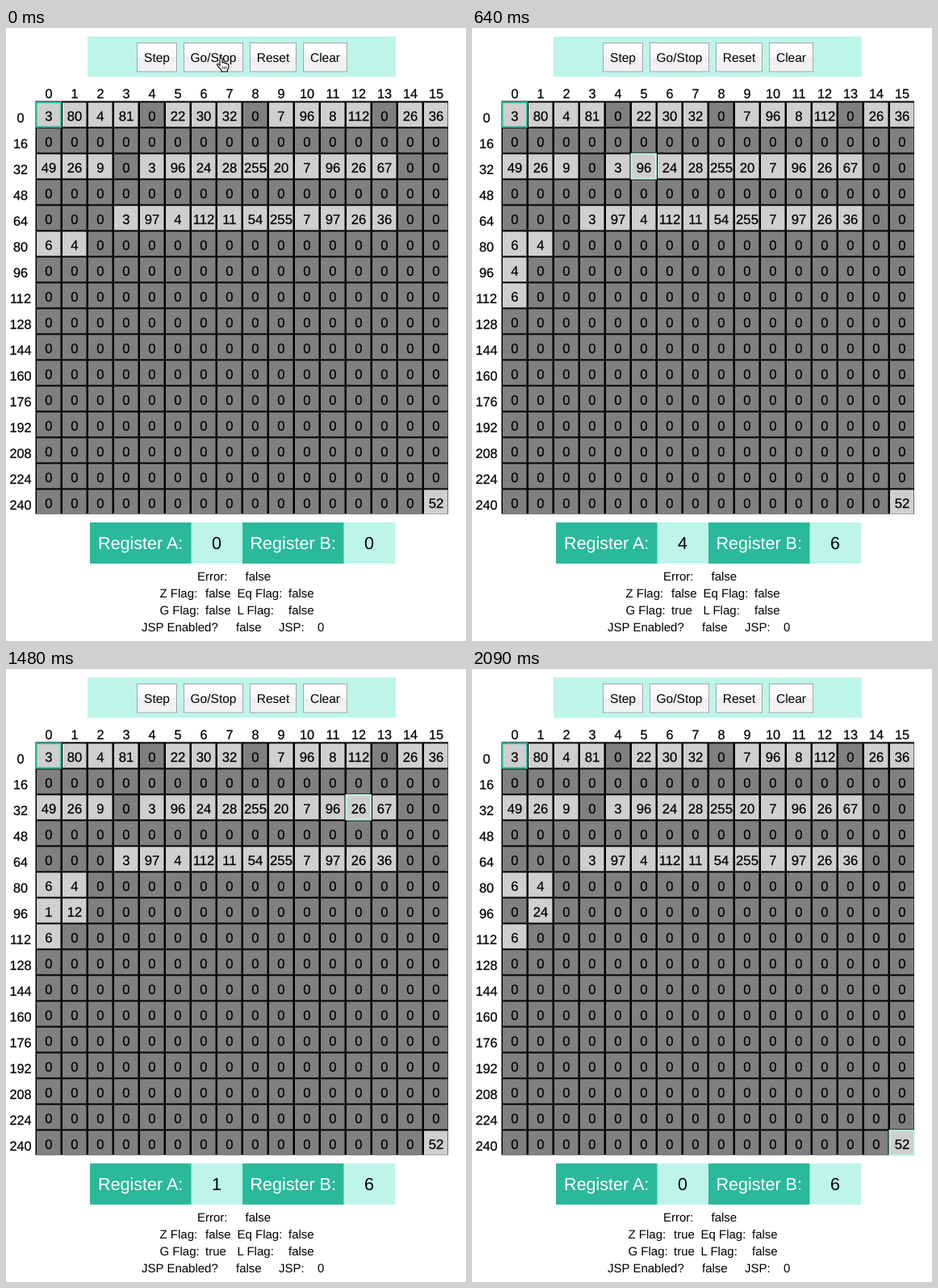
Animation, 570 px wide and 760 px high, one loop 2610 ms. Source, as an HTML page:

```html
<!DOCTYPE html>
<html lang="en">
<head>
<meta charset="utf-8">
<title>Memory machine</title>
<style>
  html, body { margin: 0; width: 100%; height: 100%; overflow: hidden; background: #fff; }
  svg { display: block; width: 570px; height: 760px; font-family: "Liberation Sans", Arial, sans-serif; text-rendering: geometricPrecision; }
  .mid { text-anchor: middle; }
  .head { font-size: 16.3px; }
  .cell { font-size: 16.7px; }
  .head, .cell { stroke: #000; stroke-width: .25px; }
  .btn { font-size: 15.5px; }
  .reg { font-size: 21.5px; }
  .stat { font-size: 15px; }
</style>
</head>
<body>
<svg id="stage" viewBox="0 0 570 760">
  <defs>
    <linearGradient id="up" x2="0" y2="1">
      <stop offset="0" stop-color="#fff"/>
      <stop offset=".48" stop-color="#f9f9f9"/>
      <stop offset=".52" stop-color="#eee"/>
      <stop offset="1" stop-color="#f4f4f4"/>
    </linearGradient>
    <linearGradient id="down" x2="0" y2="1">
      <stop offset="0" stop-color="#b9b9b9"/>
      <stop offset=".48" stop-color="#b5b5b5"/>
      <stop offset=".52" stop-color="#acacac"/>
      <stop offset="1" stop-color="#b2b2b2"/>
    </linearGradient>
  </defs>
</svg>
<script>
const LOOP = 2610, START = 324, TICK = 16.2, LAST_STEP = 107;
const PRESS = 240, RELEASE = 350, CURSOR_GONE = 420;
const MINT = "#bdf5e9", TEAL = "#2bb99b";

// Moments at which the screen refreshes
const REFRESH = [0, 240, 350, 420, 490, 560, 640, 700, 760,
  820, 880, 930, 990, 1050, 1110, 1160, 1220, 1300,
  1360, 1430, 1490, 1560, 1620, 1690, 1750, 1810, 1870,
  1920, 1980, 2030, 2090];

// Program and data, by start address
const PROGRAM = {
  0: [3, 80, 4, 81, 0, 22, 30, 32, 0, 7, 96, 8, 112, 0, 26, 36],
  32: [49, 26, 9, 0, 3, 96, 24, 28, 255, 20, 7, 96, 26, 67],
  67: [3, 97, 4, 112, 11, 54, 255, 7, 97, 26, 36],
  80: [6, 4],
  255: [52]
};

// Instructions without an operand
const PLAIN = {
  11: s => { s.a += s.b; },
  20: s => { s.a--; },
  22: s => { s.g = s.a > s.b; },
  24: s => { s.z = s.a === 0; },
  49: s => { [s.a, s.b] = [s.b, s.a]; }
};
// Instructions with an operand; a returned number is the jump address
const WITH_ARG = {
  3: (s, n) => { s.a = s.mem[n]; },
  4: (s, n) => { s.b = s.mem[n]; },
  7: (s, n) => { s.mem[n] = s.a; },
  8: (s, n) => { s.mem[n] = s.b; },
  26: (s, n) => n,
  28: (s, n) => s.z ? n : undefined,
  30: (s, n) => s.g ? n : undefined,
  54: () => undefined
};

function run(steps) {
  const s = { mem: new Array(256).fill(0), pc: 0, a: 0, b: 0, z: false, g: false };
  for (const at in PROGRAM) PROGRAM[at].forEach((v, i) => { s.mem[+at + i] = v; });
  let pending = null;
  for (let i = 0; i < steps; i++) {
    const byte = s.mem[s.pc];
    let jump;
    if (pending) {
      jump = pending(s, byte);
      pending = null;
    } else if (WITH_ARG[byte]) {
      pending = WITH_ARG[byte];
    } else if (PLAIN[byte]) {
      PLAIN[byte](s);
    }
    s.pc = jump === undefined ? s.pc + 1 : jump;
  }
  return s;
}

const stage = document.getElementById("stage");

function add(tag, attrs, label) {
  const el = document.createElementNS("http://www.w3.org/2000/svg", tag);
  for (const k in attrs) el.setAttribute(k, attrs[k]);
  if (label !== undefined) el.textContent = label;
  return stage.appendChild(el);
}
const rect = (x, y, width, height, fill, more) => add("rect", { x, y, width, height, fill, ...more });
const text = (x, y, cls, label, fill = "#000") => add("text", { x, y, class: cls, fill }, label);
const outline = color => rect(0, 0, 30.5, 30.5, "none", { stroke: color, "stroke-width": 2 });

function place(box, addr) {
  box.setAttribute("x", 37.5 + 32 * (addr % 16));
  box.setAttribute("y", 92.2 + 32 * (addr >> 4));
}

// Toolbar
rect(101, 10.5, 382, 50, MINT);
const buttons = [["Step", 162, 50], ["Go/Stop", 220, 74], ["Reset", 302, 58], ["Clear", 368, 55]]
  .map(([label, x, w]) => {
    const box = rect(x + .5, 18.5, w - 1, 35.5, "url(#up)", { stroke: "#a6a6a6" });
    text(x + w / 2, 42.2, "btn mid", label);
    return box;
  });

// Memory grid
rect(36.5, 90.5, 511.5, 512, "#000");
for (let i = 0; i < 16; i++) {
  text(53 + 32 * i, 86.6, "head mid", i);
  text(18, 116.5 + 32 * i, "head mid", 16 * i);
}
const cells = Array.from({ length: 256 }, (_, i) => {
  const x = 32 * (i % 16), y = 32 * (i >> 4);
  return {
    box: rect(38 + x, 92.5 + y, 29.5, 30, "#808080"),
    num: text(53 + x, 114.7 + y, "cell mid", 0)
  };
});
place(outline(TEAL), 0);
const pointer = outline(MINT);

// Registers
function register(x, label) {
  rect(x, 613, 189.5, 51, MINT);
  rect(x, 613, 125.5, 51, TEAL);
  text(x + 62.7, 646, "reg mid", label, "#fff");
  return text(x + 157, 646, "reg mid", 0);
}
const regA = register(104, "Register A:");
const regB = register(293, "Register B:");

// Status lines
const stat = (x, y, label) => text(x, y, "stat", label);
stat(237, 685, "Error:");
stat(296.5, 685, "false");
const flagLeft = [stat(190.5, 706, "Z Flag:"), stat(190.5, 727, "G Flag:")];
const zFlag = stat(247, 706), gFlag = stat(247, 727);
flagLeft.push(zFlag, gFlag);
const flagRight = [
  stat(286.5, 706, "Eq Flag:"), stat(286.5, 727, "L Flag:"),
  stat(350, 706, "false"), stat(350, 727, "false")
];
stat(168, 748, "JSP Enabled?");
stat(285, 748, "false");
stat(338, 748, "JSP:");
stat(386, 748, "0");

// Hand cursor
const cursor = add("g", {});
cursor.append(
  add("path", {
    d: "M265 47 V38.6 Q265 37 266.5 37 Q268 37 268 38.6 V43 Q270.4 42 270.8 43.7 " +
       "Q273 42.9 273.4 44.6 Q275.8 44 275.8 46.4 V49 Q275.6 51 274.3 52 V54 H267 V52.4 " +
       "L262 46.7 Q261 45.2 262.3 44.5 Q263.4 44.2 265 46.2 Z",
    fill: "#fff", stroke: "#000", "stroke-width": 1.1, "stroke-linejoin": "round"
  }),
  add("path", { d: "M268.7 47.5 V51 M270.8 47.5 V51 M272.9 47.5 V51", stroke: "#000", "stroke-width": .8 })
);

const show = (el, on) => el.setAttribute("visibility", on ? "visible" : "hidden");

function draw(t) {
  const steps = Math.max(0, Math.min(LAST_STEP, Math.floor((t - START) / TICK)));
  const s = run(steps);
  s.mem.forEach((v, i) => {
    cells[i].num.textContent = v;
    cells[i].box.setAttribute("fill", v ? "#cfcfcf" : "#808080");
  });
  place(pointer, s.pc);
  show(pointer, steps > 0);
  regA.textContent = s.a;
  regB.textContent = s.b;
  zFlag.textContent = s.z;
  gFlag.textContent = s.g;
  // The flag table narrows once its value column holds only "true"
  const shift = s.z && s.g ? 3 : 0;
  flagLeft.forEach(el => el.setAttribute("transform", `translate(${shift})`));
  flagRight.forEach(el => el.setAttribute("transform", `translate(${-shift})`));
  buttons[1].setAttribute("fill", t >= PRESS && t < RELEASE ? "url(#down)" : "url(#up)");
  show(cursor, t < CURSOR_GONE);
}

const begin = performance.now();
let shown = -1;
function frame() {
  const t = (performance.now() - begin) % LOOP;
  const now = REFRESH.filter(r => r <= t).pop();
  if (now !== shown) draw(shown = now);
  requestAnimationFrame(frame);
}
frame();
</script>
</body>
</html>
```
